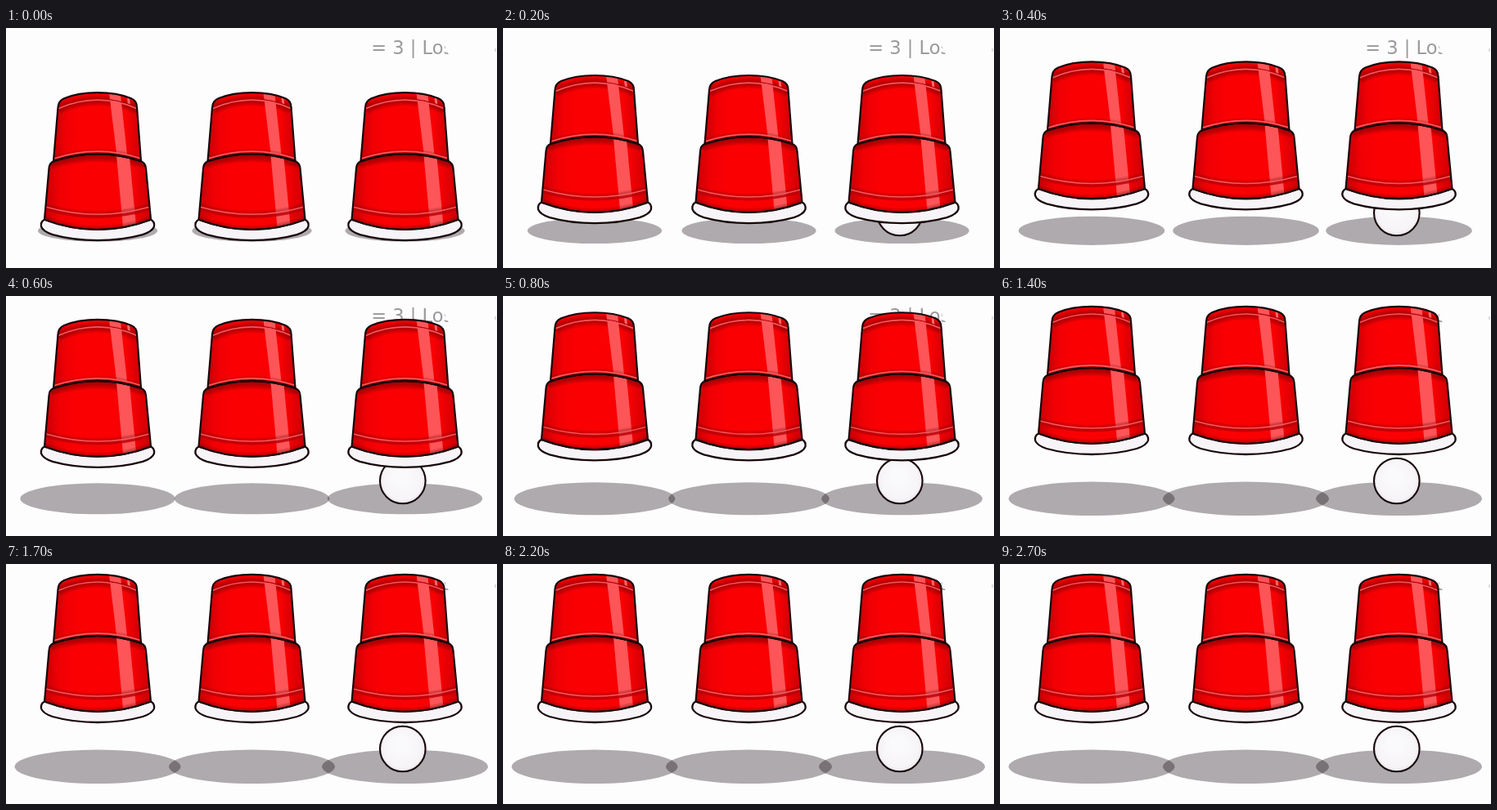
Animation of 600 by 294 pixels, one loop 2800 ms. Source, as an HTML page with a canvas:

```html
<!DOCTYPE html>
<html lang="en">
<head>
<meta charset="utf-8">
<title>Three cups</title>
<style>
  html, body { margin: 0; width: 100%; height: 100%; overflow: hidden; background: #fefdfe; }
  canvas { display: block; }
</style>
</head>
<body>
<canvas id="stage" width="600" height="294"></canvas>
<script>
const ctx = document.getElementById('stage').getContext('2d');
const LOOP = 2800, STEP = 100, RISE_TIME = 1300, RISE = 66.2;
const CUPS = [112, 300.5, 487.5];
const INK = '#180709';

function fill(path, style) {
  ctx.fillStyle = style;
  ctx.fill(path);
}

function stroke(path, style, width) {
  ctx.strokeStyle = style;
  ctx.lineWidth = width;
  ctx.stroke(path);
}

function ellipse(x, y, rx, ry) {
  const path = new Path2D();
  path.ellipse(x, y, rx, ry, 0, 0, Math.PI * 2);
  return path;
}

// Symmetric arc around x = 0 passing through (0, mid)
function arc(half, y, mid) {
  return new Path2D(`M${-half} ${y}Q0 ${2 * mid - y} ${half} ${y}`);
}

// Dark line that fades out on both sides
function softShade(half, y, mid, size) {
  for (let width = size; width > 1; width -= 2) {
    stroke(arc(half, y, mid), 'rgba(110,0,6,.1)', width);
  }
}

const upper = new Path2D('M-48.5 31Q-48 23 -41 20Q-24 12.9 0 12.9T41 20Q48 23 48 31L53 97Q0 79 -54 97Z');
const lower = new Path2D('M-54 97Q0 79 53 97Q58.5 99 59 106L65 168.5Q0 193 -65 168.5L-59.5 106Q-59 99 -54 97Z');
const rim = new Path2D('M-65 168.5Q0 193 65 168.5Q70 171 69 177Q67 183 55 187Q30 194 0 194T-55 187Q-67 183 -69 177Q-70 171 -65 168.5Z');
const shineTop = new Path2D('M14 13L28 15L36 89L23 87Z');
const shineBottom = new Path2D('M23 90L39 92L47 176L31 178Z');
const glint = new Path2D('M36 19L39 20L40 29L37 28Z');

function sideShade(half) {
  const g = ctx.createLinearGradient(-half, 0, half, 0);
  g.addColorStop(0, '#c40006');
  g.addColorStop(0.14, '#f00004');
  g.addColorStop(0.3, '#fb0003');
  g.addColorStop(0.82, '#f90003');
  g.addColorStop(1, '#c80006');
  return g;
}

function body(path, half, details) {
  fill(path, sideShade(half));
  ctx.save();
  ctx.clip(path);
  details();
  ctx.restore();
  stroke(path, INK, 2.2);
}

function drawCup(x, lift) {
  ctx.save();
  ctx.translate(x, RISE - lift);
  ctx.lineJoin = 'round';

  fill(rim, '#f7f4f8');
  stroke(rim, INK, 2.3);

  body(lower, 65, () => {
    softShade(58, 99, 90, 16);
    fill(shineBottom, '#fd5558');
    softShade(63, 153, 162, 9);
    stroke(arc(63, 156, 165), 'rgba(190,0,8,.8)', 3);
    stroke(arc(63, 153, 162), '#f5585c', 1.5);
    softShade(65, 168.5, 180.5, 10);
  });

  body(upper, 54, () => {
    softShade(48, 33, 22, 14);
    fill(shineTop, '#fd5558');
    fill(glint, '#ff6a6a');
    stroke(arc(48, 31, 20.5), '#b00008', 1.4);
    stroke(arc(48, 32.5, 22), '#f5585c', 1.7);
    softShade(54, 94, 85, 7);
    stroke(arc(54, 94, 85), '#f5585c', 1.8);
  });
  stroke(arc(54, 97, 88), INK, 2.4);
  ctx.restore();
}

function drawBall() {
  const g = ctx.createRadialGradient(482, 220, 8, 485, 226.5, 28);
  g.addColorStop(0, '#faf9fb');
  g.addColorStop(0.8, '#f6f4f7');
  g.addColorStop(1, '#e8e5ea');
  const ball = ellipse(484.8, 226.5, 27.8, 27.8);
  fill(ball, g);
  stroke(ball, INK, 2.1);
}

function drawScore() {
  ctx.font = '22.5px "DejaVu Sans", sans-serif';
  ctx.fillStyle = '#9c999d';
  ctx.fillText('= 3 | Los', 446.3, 31.6);
  fill(ellipse(566, 14, 31, 31), '#fefdfe');
  ctx.fillStyle = '#dedbdf';
  ctx.fillRect(597, 25, 2, 4);
}

function draw(time) {
  const progress = Math.min(time / RISE_TIME, 1);
  const lift = RISE * (1 - Math.pow(1 - progress, 2.3));

  ctx.fillStyle = '#fefdfe';
  ctx.fillRect(0, 0, 600, 294);
  drawScore();
  for (const x of CUPS) {
    fill(ellipse(x, 248.3, 73 + 0.43 * lift, 13.5 + 0.11 * lift), 'rgba(10,0,8,.33)');
  }
  drawBall();
  for (const x of CUPS) drawCup(x, lift);
}

const start = performance.now();
function tick() {
  const elapsed = (performance.now() - start) % LOOP;
  draw(Math.floor(elapsed / STEP) * STEP);
  requestAnimationFrame(tick);
}
tick();
</script>
</body>
</html>
```
